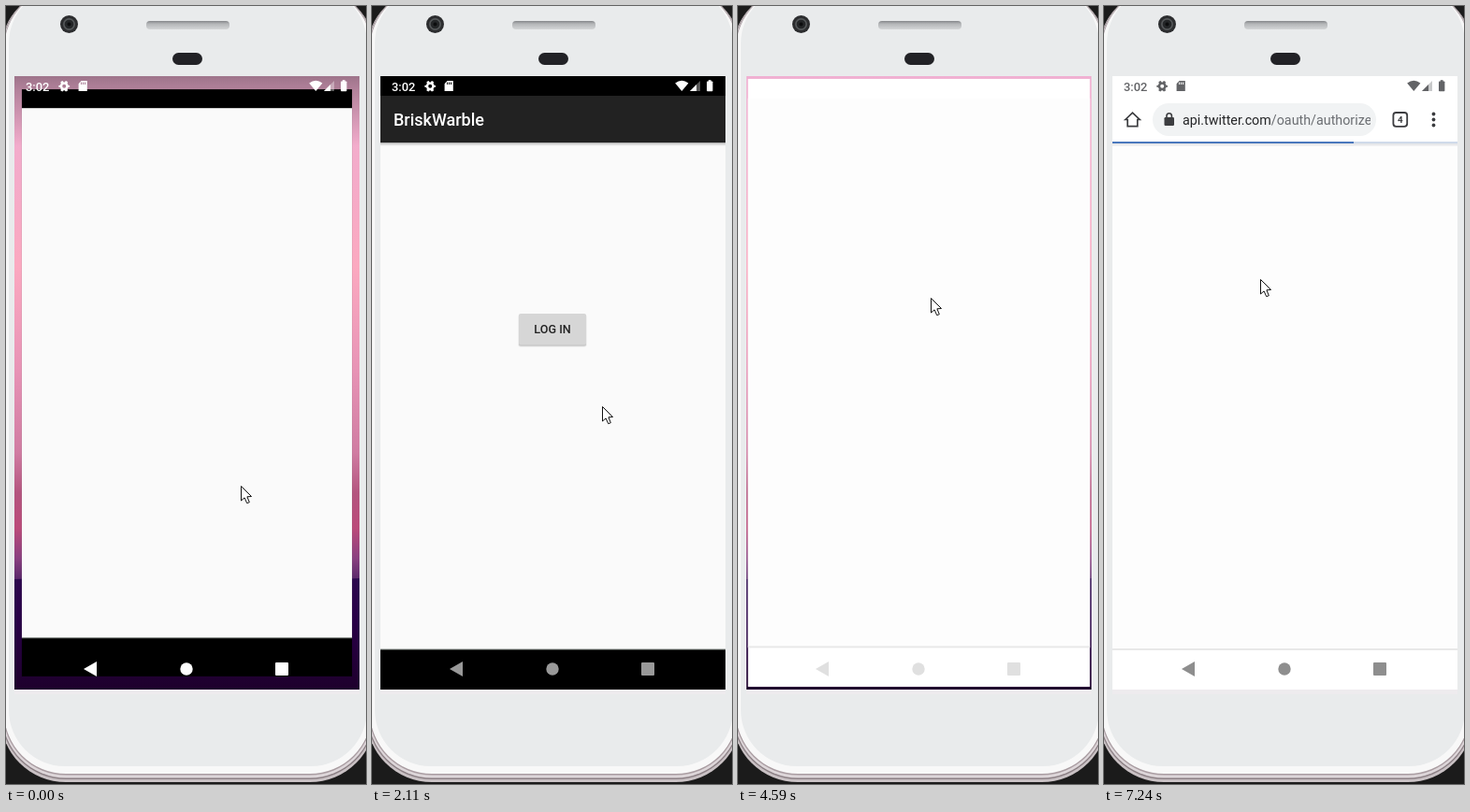
These frames come from a looping animation (385x832 px, 8 s). An HTML page with a canvas:

```html
<!DOCTYPE html>
<html lang="en">
<head>
<meta charset="utf-8">
<title>Log in flow</title>
<style>
  html, body { margin: 0; width: 100%; height: 100%; overflow: hidden; background: #1b1b1b; }
  canvas { display: block; width: 385px; height: 832px; }
</style>
</head>
<body>
<canvas id="stage" width="385" height="832"></canvas>
<script>
const ctx = document.getElementById('stage').getContext('2d');
const LOOP = 8000;
const SCREEN = { x: 9, y: 75, w: 369, h: 656, cx: 193.5, cy: 403 };
const TITLE = 'BriskWarble';

// Each track is [start time, ...values]; values hold until the next key.
const CURSOR = [
  [0, 251, 513], [2110, 246, 428], [2230, 246, 411], [2380, 240, 390],
  [2500, 230, 366], [2620, 221, 351], [2770, 216, 348], [2890, 213, 347],
  [4020, 209, 347], [4170, 204, 341], [4290, 191, 326], [4440, 199, 319],
  [4590, 206, 312], [4740, 212, 307], [4890, 215, 305], [5790, 203, 290],
  [5940, 193, 285], [6300, 184, 285], [6450, 173, 289], [6720, 168, 292],
  [6840, 167, 292]
];
const NAV = [[0, 255], [630, 233], [780, 226], [1020, 186], [1320, 153],
  [4170, 224], [4890, 125], [5790, 142]];
const ZOOM = [[0, 0.957], [150, 0.985], [270, 1], [4170, 0.975], [4290, 0.96],
  [4440, 0.962], [4590, 0.991], [4740, 1]];
const SLIDE = [[0, 0], [4290, 1], [4440, 2]];
const BUTTON = [[0, 214], [2770, 208], [2890, 200], [3040, 192], [3160, 203], [3310, 214]];
const PROGRESS = [[0, 0], [6960, 27], [7240, 267]];

function at(track, t) {
  let key = track[0];
  for (const k of track) if (k[0] <= t) key = k;
  return key.slice(1);
}

const gray = v => `rgb(${v},${v},${v})`;

function rect(x, y, w, h, color) {
  ctx.fillStyle = color;
  ctx.fillRect(x, y, w, h);
}

function round(x, y, w, h, r, color) {
  ctx.fillStyle = color;
  ctx.beginPath();
  ctx.roundRect(x, y, w, h, r);
  ctx.fill();
}

function disc(x, y, r, color) {
  ctx.fillStyle = color;
  ctx.beginPath();
  ctx.arc(x, y, r, 0, Math.PI * 2);
  ctx.fill();
}

function poly(points, color) {
  ctx.fillStyle = color;
  ctx.beginPath();
  points.forEach(([x, y]) => ctx.lineTo(x, y));
  ctx.closePath();
  ctx.fill();
}

function text(str, x, y, size, color, weight = 400, align = 'left') {
  ctx.font = `${weight} ${size}px Roboto, sans-serif`;
  ctx.textAlign = align;
  ctx.fillStyle = color;
  ctx.fillText(str, x, y);
}

function vertical(y0, y1, stops) {
  const g = ctx.createLinearGradient(0, y0, 0, y1);
  stops.forEach(([p, c]) => g.addColorStop(p, c));
  return g;
}

function phone() {
  rect(0, 0, 385, 832, '#1b1b1b');
  const shells = [
    [-6, 830, 70, '#c9c1c4'], [-5, 827, 69, '#8b7f84'], [-4, 825.5, 68, '#ddd6d9'],
    [-3, 822.5, 67, '#a99ca1'], [-2, 821, 66, '#f8f8f8'], [3, 813, 60, '#e9ebec']
  ];
  for (const [x, bottom, r, c] of shells) round(x, -20, 389 - 2 * x, bottom + 20, r, c);
  round(150, 16, 89, 9, 4, vertical(16, 25, [[0, '#85878a'], [0.35, '#b4b6b8'], [1, '#d3d5d6']]));
  round(178, 50, 32, 13, 6.5, '#222226');
  disc(67.5, 19.5, 9.5, '#2c2d2f');
  disc(67.5, 19.5, 6.5, '#55585a');
  disc(67.5, 19.5, 4.8, '#242628');
  disc(67.5, 19.5, 2, '#0c0d0e');
  rect(9, 731, 369, 5, '#eeebee');
}

function wallpaper(dim) {
  rect(9, 75, 369, 656, vertical(75, 612, [
    [0, '#f0b0d2'], [0.2, '#f4abc9'], [0.38, '#fba9c0'], [0.58, '#e894b6'],
    [0.75, '#d07ca2'], [0.83, '#b4557f'], [0.9, '#bb4b7a'], [0.96, '#8a4080'], [1, '#5d2a6c']
  ]));
  const hill = vertical(606, 731, [[0, '#2e0a50'], [0.4, '#290048'], [1, '#1e002c']]);
  poly([[9, 613], [60, 611], [150, 606], [167, 611], [250, 618], [378, 612], [378, 731], [9, 731]], hill);
  poly([[150, 628], [167, 625], [167, 627], [150, 630]], '#472060');
  if (dim) {
    rect(9, 75, 369, 75, vertical(75, 150, [[0, 'rgba(0,0,0,.34)'], [0.2, 'rgba(0,0,0,.26)'], [1, 'rgba(0,0,0,0)']]));
  }
}

function windowed(zoom, shift, draw) {
  ctx.save();
  ctx.translate(SCREEN.cx + shift, SCREEN.cy);
  ctx.scale(zoom, zoom);
  ctx.translate(-SCREEN.cx, -SCREEN.cy);
  draw();
  ctx.restore();
}

function splash() {
  rect(9, 75, 369, 656, '#000');
  rect(9, 96, 369, 592, '#fafafa');
  rect(9, 687.5, 369, 1, '#8d938f');
}

function loginPage(t) {
  splash();
  if (t < 1320) return;
  ctx.globalAlpha = t < 1440 ? 0.55 : 1;
  rect(9, 146, 369, 4, vertical(146, 150, [[0, '#a9a9a9'], [0.5, '#dedede'], [1, '#fafafa']]));
  rect(9, 96, 369, 50, '#222');
  text(TITLE, 23, 128, 18, '#fff', 500);
  const [tone] = at(BUTTON, t);
  round(156.5, 330, 73, 34.5, 2, '#e3e3e3');
  round(157, 330, 72, 33.5, 2, '#c2c2c2');
  round(157, 329, 72, 33.5, 2, gray(tone));
  text('LOG IN', 193, 350, 12.6, '#222', 500, 'center');
  ctx.globalAlpha = 1;
}

function homeIcon() {
  ctx.strokeStyle = '#3c3d40';
  ctx.lineWidth = 1.7;
  ctx.lineJoin = 'miter';
  ctx.beginPath();
  [[22.8, 121.5], [30.5, 114.2], [38.2, 121.5], [35.8, 121.5], [35.8, 128.7],
   [25.2, 128.7], [25.2, 121.5]].forEach(([x, y]) => ctx.lineTo(x, y));
  ctx.closePath();
  ctx.stroke();
}

function lockIcon() {
  round(64.5, 119, 10.5, 9, 1.2, '#3c3d40');
  ctx.strokeStyle = '#3c3d40';
  ctx.lineWidth = 1.6;
  ctx.beginPath();
  ctx.moveTo(67, 120);
  ctx.lineTo(67, 117.5);
  ctx.arc(69.7, 117.5, 2.7, Math.PI, 0);
  ctx.lineTo(72.4, 120);
  ctx.stroke();
}

function address(t) {
  ctx.save();
  ctx.beginPath();
  ctx.rect(60, 104, 225, 35);
  ctx.clip();
  const host = 'api.twitter.com';
  text(host, 84, 127, 14.3, '#242527');
  const w = ctx.measureText(host).width;
  text('/oauth/authorize', 84 + w, 127, 14.3, '#6b6e72');
  ctx.restore();
  if (t >= 6960) lockIcon();
}

function browser(t) {
  rect(9, 75, 369, 656, '#fff');
  rect(9, 96, 369, 592, '#fdfdfd');
  rect(9, 687, 369, 2, '#e8e8e8');
  if (t < 4890) return;

  rect(9, 75, 369, 71, '#fff');
  const loading = t >= 6720;
  const left = loading ? 52 : 16;
  round(left, 104, 291 - left, 35, 17.5, '#f1f3f4');
  if (t >= 5160) {
    rect(9, 146, 369, 4, vertical(146, 150, [[0, '#dfe0e3'], [0.5, '#e6e7e9'], [1, '#f6f6f7']]));
    ctx.strokeStyle = '#3c3d40';
    ctx.lineWidth = 1.8;
    ctx.beginPath();
    ctx.roundRect(309.4, 114, 14.8, 14.8, 3);
    ctx.stroke();
    for (const y of [115.5, 121.5, 127.5]) disc(352.5, y, 1.9, '#3c3d40');
    if (!loading) text('Search or type web address', 24.5, 127, 14.4, '#6b6e72');
  }
  if (loading) {
    homeIcon();
    text('4', 316.8, 125, 9.8, '#3c3d40', 700, 'center');
    if (t >= 6840) address(t);
  }
  const [end] = at(PROGRESS, t);
  if (end) {
    rect(9, 145, 369, 2, '#cfdaea');
    rect(9, 145, end - 9, 2, '#4a78bd');
  }
}

function statusBar(color) {
  text('3:02', 21, 90.5, 12.9, color, 500);

  // Gear: a toothed ring around an open centre.
  ctx.fillStyle = color;
  ctx.beginPath();
  for (let i = 0; i < 32; i++) {
    const a = (i + 0.5) / 32 * Math.PI * 2;
    const r = Math.cos(a * 6) > 0 ? 6 : 4.4;
    ctx.lineTo(62.2 + r * Math.cos(a), 85.8 + r * Math.sin(a));
  }
  ctx.closePath();
  ctx.arc(62.2, 85.8, 2, 0, Math.PI * 2);
  ctx.fill('evenodd');

  // Memory card with three contact slots.
  ctx.beginPath();
  ctx.moveTo(80.5, 80);
  ctx.lineTo(86.8, 80);
  ctx.lineTo(86.8, 91);
  ctx.lineTo(77.6, 91);
  ctx.lineTo(77.6, 83.2);
  ctx.closePath();
  for (let i = 0; i < 3; i++) ctx.rect(80.1 + i * 2, 81.6, 1, 2.4);
  ctx.fill('evenodd');

  ctx.beginPath();
  ctx.moveTo(331.3, 91);
  ctx.lineTo(324.2, 82.4);
  ctx.quadraticCurveTo(331.3, 77.3, 338.4, 82.4);
  ctx.closePath();
  ctx.fill();

  ctx.globalAlpha = 0.35;
  poly([[340, 91], [351, 80], [351, 91]], color);
  ctx.globalAlpha = 1;
  poly([[340, 91], [347, 84], [347, 91]], color);

  round(358, 80.5, 6.4, 10.7, 0.8, color);
  rect(359.8, 79.2, 2.8, 2, color);
}

function navBar(color) {
  poly([[83, 709], [97, 701], [97, 717]], color);
  disc(193, 709, 6.7, color);
  round(288, 702, 14, 14, 1, color);
}

function cursor(x, y) {
  ctx.save();
  ctx.translate(x + 0.5, y + 0.5);
  poly([[0, 0], [0, 15.5], [3.6, 12.4], [6.2, 18.2], [8.8, 17.2], [6.4, 11.3], [11, 11]], '#fff');
  ctx.strokeStyle = '#111';
  ctx.lineWidth = 1;
  ctx.lineJoin = 'miter';
  ctx.stroke();
  ctx.restore();
}

function render(t) {
  const [zoom] = at(ZOOM, t);
  const [slide] = at(SLIDE, t);
  phone();

  ctx.save();
  ctx.beginPath();
  ctx.rect(SCREEN.x, SCREEN.y, SCREEN.w, SCREEN.h);
  ctx.clip();
  if (zoom < 1) wallpaper(t < 270);
  if (slide < 2) windowed(zoom, slide ? -220.6 : 0, () => loginPage(t));
  if (slide > 0) windowed(zoom, slide === 1 ? 150.6 : 0, () => browser(t));
  statusBar(t >= 4890 ? '#626366' : '#fff');
  navBar(gray(at(NAV, t)[0]));
  ctx.restore();

  cursor(...at(CURSOR, t));
}

const start = performance.now();
function tick() {
  render((performance.now() - start) % LOOP);
  requestAnimationFrame(tick);
}
tick();
</script>
</body>
</html>
```
